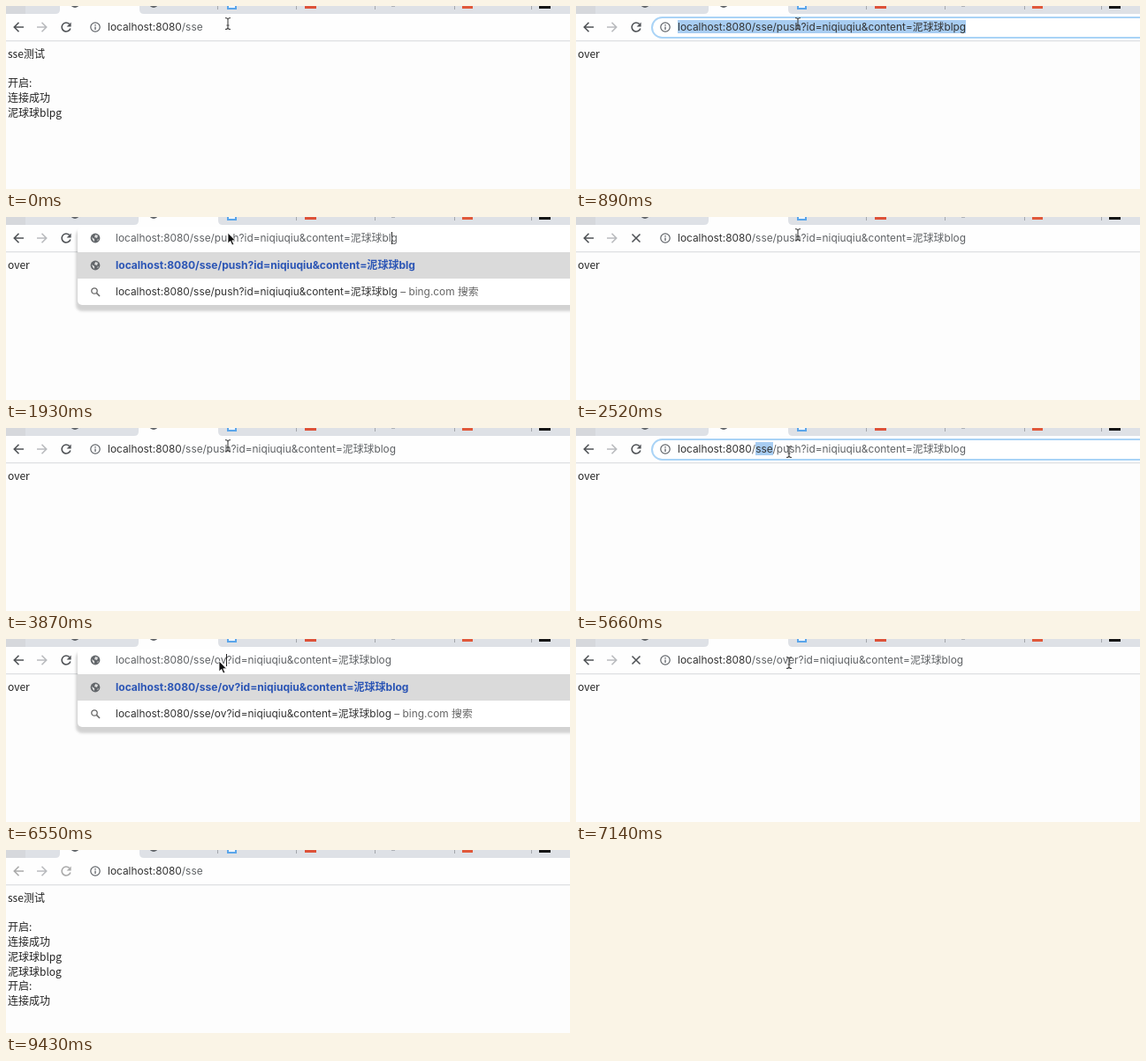
An HTML page that plays this animation: 638 by 208 pixels, repeating every 9530 ms.

```html
<!DOCTYPE html>
<html lang="zh">
<head>
<meta charset="utf-8">
<title>SSE</title>
<style>
html, body { margin: 0; width: 100%; height: 100%; overflow: hidden; background: #fdfdfd; }
body { position: relative; font: 11.88px/16px Inter, "Noto Sans CJK SC", sans-serif; color: #333; }
svg { position: absolute; left: 0; top: 0; overflow: visible; }
div { position: absolute; white-space: pre; }
#page { left: 2px; top: 46px; font: 12px/16.7px "Noto Sans CJK SC", sans-serif; color: #222; }
#pill { left: 85px; top: 12px; width: 600px; height: 21px; border: 2px solid #a9d3f6; border-radius: 13px; background: #fff; }
#drop { left: 81px; top: 11px; width: 600px; background: #fff; border-radius: 5px; box-shadow: 0 5px 3px 2px rgba(0,0,0,.17); }
.row { left: 0; width: 100%; height: 30px; line-height: 30px; text-indent: 43px; }
.row:first-child { background: #dadada; color: #2b55b5; font-weight: 700; font-size: 12.06px; }
.row span { color: #666; }
.row svg { left: 20px; top: 14.5px; }
#url { top: 16px; color: #5f6265; }
#url b { font-weight: 400; color: #333; }
#url.edit b { color: inherit; }
mark { background: #a8cdf2; color: #333; }
i { display: inline-block; width: 1px; height: 14px; margin-right: -1px; background: #222; vertical-align: -3px; }
</style>
</head>
<body>
<svg id="chrome" width="638" height="208"></svg>
<div id="page"></div>
<div id="pill"></div>
<div id="drop"></div>
<svg id="site" width="1" height="1"></svg>
<div id="url"></div>
<svg id="mouse" width="1" height="1"></svg>
<script>
const LOOP = 9530, HOST = 'localhost:8080', NAME = '泥球球';
const $ = id => document.getElementById(id);
const link = (word, action = 'push') => `${HOST}/sse/${action}?id=niqiuqiu&content=${NAME}${word}`;
const log = ['sse测试', '', '开启:', '连接成功', NAME + 'blpg', NAME + 'blog', '开启:', '连接成功'];
const all = url => `[${url}]`;

// Each entry changes part of the state; in url, [ ] is a selection and | the caret.
const steps = [
  [0, { tab: 0, lines: 5, url: link('blpg'), focus: 0, rows: 0, loading: 0, icon: 1, dim: 0, mouse: [251, 20] }],
  [440, { tab: 1 }],
  [890, { focus: 1, url: all(link('blpg')) }],
  [1340, { url: link('blpg').replace('push', 'pus|h') }],
  [1480, { url: link('blp|g') }],
  [1930, { url: link('bl|g'), rows: 2 }],
  [2230, { url: link('blo|g'), rows: 5 }],
  [2520, { url: link('blog'), rows: 0, focus: 0, loading: 1, icon: 0 }],
  [2670, { loading: 0 }],
  [2820, { icon: 1 }],
  [3120, { tab: 0, lines: 6 }],
  [3870, { tab: 1 }],
  [4320, { focus: 1, url: all(link('blog')) }],
  [4470, { mouse: [250, 21] }],
  [4620, { mouse: [249, 25] }],
  [4770, { mouse: [246, 31], url: link('blog') }],
  [4910, { mouse: [243, 37] }],
  [5060, { mouse: [241, 39] }],
  [5210, { mouse: [240, 36] }],
  [5360, { mouse: [240, 32] }],
  [5510, { mouse: [241, 27] }],
  [5660, { url: link('blog').replace('sse', '[sse]') }],
  [5960, { url: link('blog', 'pu|sh') }],
  [6110, { url: link('blog', '[push]') }],
  [6400, { url: link('blog', 'o|'), rows: 2 }],
  [6550, { url: link('blog', 'ov|') }],
  [6850, { url: link('blog', 'ove|') }],
  [7000, { url: link('blog', 'over|') }],
  [7140, { url: link('blog', 'over'), rows: 0, focus: 0, loading: 1, icon: 0 }],
  [7290, { loading: 0, icon: 1 }],
  [7590, { tab: 0 }],
  [8040, { lines: 8 }],
  [8190, { mouse: [222, 163] }],
  [8640, { mouse: [311, 148] }],
  [8790, { mouse: null }],
  [9430, { dim: 1 }]
];

const rect = (x, y, w, h, fill) => `<rect x="${x}" y="${y}" width="${w}" height="${h}" fill="${fill}"/>`;
const line = (d, color = '#505357', w = 1.6) => `<path d="${d}" fill="none" stroke="${color}" stroke-width="${w}"/>`;
const globe = '<circle r="5.4" fill="#63676b"/><path d="M-4-1L-1 1V4L-3 2ZM0-4L3-3L2 0L-1-1ZM2 2L4 1L3 3Z" fill="#ddd"/>';
const lens = '<circle cx="-1" cy="-1" r="3.2" fill="none" stroke="#666" stroke-width="1.3"/>' + line('M1.4 1.4L5 5', '#666', 1.5);
const info = '<circle r="5.2" fill="none" stroke="#5f6368" stroke-width="1.2"/>' + line('M0-3V-1.6M0-.6V3', '#5f6368', 1.3);
const beam = line('M-3-6.5Q0-6.5 0-4.5V4.5Q0 6.5-3 6.5M3-6.5Q0-6.5 0-4.5M3 6.5Q0 6.5 0 4.5M-1.5 2H1.5', '#444', 1.1);
const arrow = '<path d="M0-2V10L2.8 7.4L4.8 12L6.8 11L4.8 6.8H8.5Z" fill="#111" stroke="#fff" stroke-width=".8"/>';

function drawChrome(s) {
  const x = s.tab ? 150 : 61, ink = s.dim ? '#aaa' : '#505357';
  const favicon = cx => `<circle cx="${cx}" cy="-3" r="5" fill="#5f6368"/>`;
  const reload = line('M71.6 20.4A5 5 0 1 0 72.9 25.5', ink) + `<path d="M73.6 18.4V23.4H68.6Z" fill="${ink}"/>`;
  return rect(0, 0, 638, 9, '#dee1e6') + rect(0, 0, 22, 9, '#d6d8dc') +
    [239, 328, 417, 507, 594].map(v => rect(v, 0, 1, 4, '#a4a7ac')).join('') +
    rect(250, 0, 11, 4, '#5aa5ea') + rect(252, 0, 7, 2, '#eef5fc') +
    rect(338, 0, 13, 3, '#dd5138') + rect(516, 0, 12, 3, '#e0583a') +
    rect(436, 0, 4, 1, '#aeb2b8') + rect(603, 0, 13, 3, '#151515') +
    rect(0, 9, 638, 30, '#fefefe') + rect(0, 39, 638, 1.3, '#dfe0e2') +
    `<path d="M${x - 5} 9Q${x} 9 ${x} 4V0H${x + 90}V4Q${x + 90} 9 ${x + 95} 9Z" fill="#fefefe"/>` +
    favicon(78) + (s.icon ? favicon(167) : '') +
    line('M20 24H9.5M14.5 18.8L9.3 24L14.5 29.2', ink) +
    line('M35 24H45.5M40.5 18.8L45.7 24L40.5 29.2', '#b9bbbe') +
    (s.loading ? line('M63.5 19.5L72.5 28.5M72.5 19.5L63.5 28.5', ink) : reload);
}

const esc = text => text.replace(/&/g, '&amp;');

function drawRows(s) {
  const url = s.url.replace('|', '');
  const older = [link('blpg'), HOST + '/sse/push', HOST + '/sse'];
  return [url, url + '<span> – bing.com 搜索</span>', ...older].slice(0, s.rows).map((text, i) =>
    `<div class="row" style="top:${29 + i * 30}px">` +
    `<svg width="1" height="1">${i == 1 ? lens : globe}</svg>${esc(text)}</div>`).join('');
}

function draw(s) {
  const focus = s.tab && s.focus, rows = s.tab && s.rows;
  $('chrome').innerHTML = drawChrome(s);
  $('page').textContent = s.tab ? 'over' : log.slice(0, s.lines).join('\n');
  $('pill').style.display = focus && !rows ? '' : 'none';
  $('drop').style.display = rows ? '' : 'none';
  $('drop').style.height = 29 + rows * 30 + 'px';
  $('drop').innerHTML = rows ? drawRows(s) : '';
  $('site').innerHTML = `<g transform="translate(101 24)">${rows ? globe : info}</g>`;
  $('url').className = rows ? 'edit' : '';
  $('url').style.left = (rows ? 124 : 115) + 'px';
  $('url').innerHTML = esc(s.tab ? s.url : HOST + '/sse').replace(HOST, '<b>$&</b>')
    .replace('[', '<mark>').replace(']', '</mark>').replace('|', '<i></i>');
  $('mouse').innerHTML = s.mouse
    ? `<g transform="translate(${s.mouse})">${rows || s.mouse[1] > 100 ? arrow : beam}</g>` : '';
}

let shown = -1;
function tick(now) {
  const t = now % LOOP;
  const count = steps.filter(([at]) => at <= t).length;
  if (count !== shown) {
    shown = count;
    draw(Object.assign({}, ...steps.slice(0, count).map(step => step[1])));
  }
  requestAnimationFrame(tick);
}
tick(0);
</script>
</body>
</html>
```
